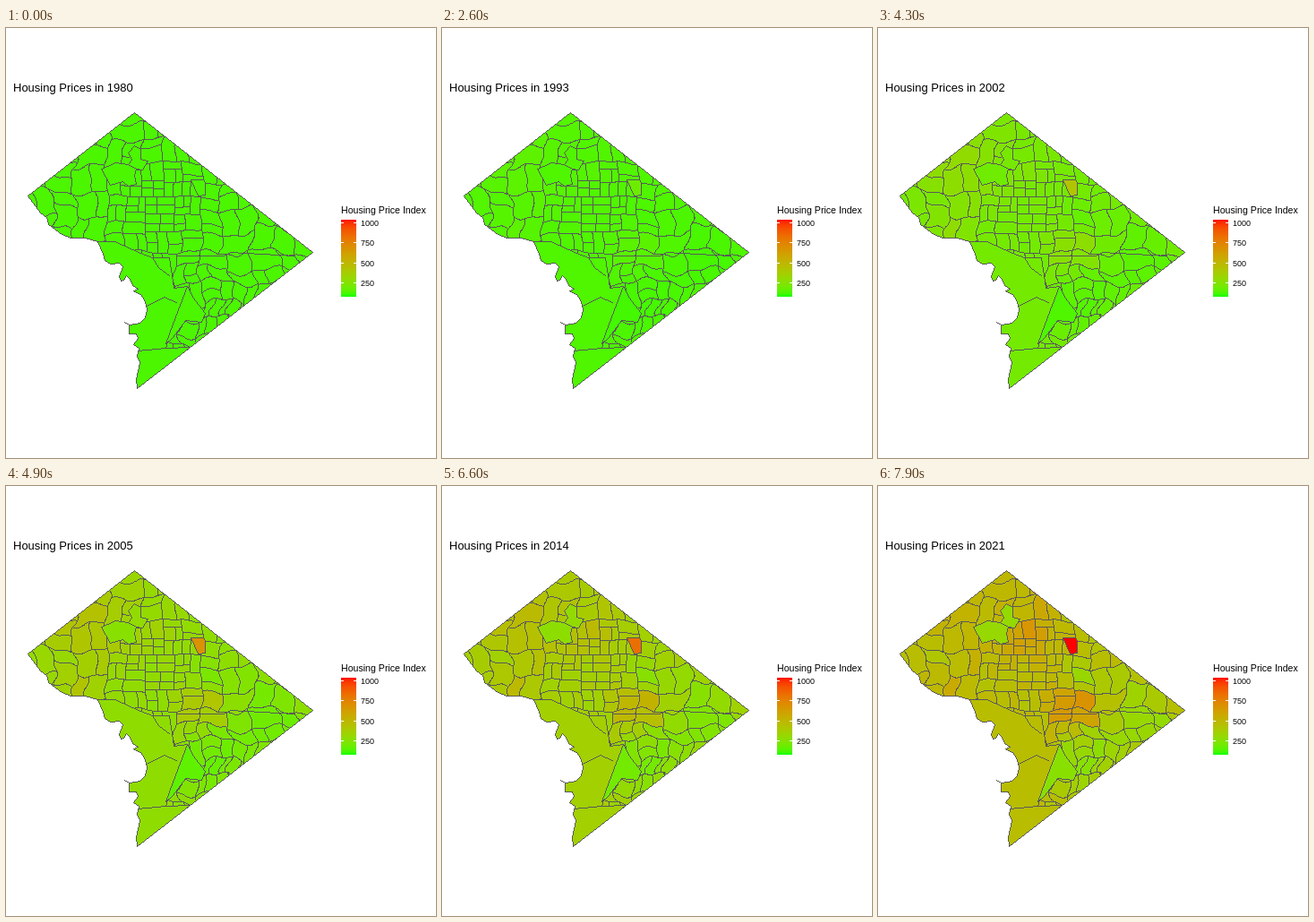
Write an HTML page with a canvas that moves like this. It is 480 px wide and 480 px high and loops after 10000 ms.

```html
<!DOCTYPE html>
<html lang="en">
<head>
<meta charset="utf-8">
<title>Housing Prices</title>
<style>
html, body { margin: 0; width: 100%; height: 100%; overflow: hidden; background: #fff; }
canvas { display: block; }
</style>
</head>
<body>
<canvas id="stage" width="480" height="480"></canvas>
<script>
const ctx = document.getElementById('stage').getContext('2d');
const LOW = 73, HIGH = 1033, STEPS = 79, STEP_MS = 100, LOOP_MS = 10000;
const FONT = '"Liberation Sans", Arial, sans-serif';

const clamp = t => Math.max(0, Math.min(1, t));
const lerp = (a, b, t) => a + (b - a) * t;
const parse = s => s.trim().split(/\s+/).map(p => p.split(',').map(Number));

function seeded(seed) {
  return () => {
    seed = seed + 0x6D2B79F5 | 0;
    let t = Math.imul(seed ^ seed >>> 15, 1 | seed);
    t = t + Math.imul(t ^ t >>> 7, 61 | t) ^ t;
    return ((t ^ t >>> 14) >>> 0) / 4294967296;
  };
}
const random = seeded(41);

// Green to red, blended in Lab space
function colour(value) {
  const t = clamp((value - LOW) / (HIGH - LOW));
  const fy = (lerp(87.73, 53.24, t) + 16) / 116;
  const fx = fy + lerp(-86.18, 80.09, t) / 500;
  const fz = fy - lerp(83.18, 67.2, t) / 200;
  const cube = f => f > 6 / 29 ? f ** 3 : (f - 4 / 29) * 108 / 841;
  const x = 0.9505 * cube(fx), y = cube(fy), z = 1.089 * cube(fz);
  const gamma = c => Math.round(255 * clamp(
    c > 0.0031308 ? 1.055 * c ** (1 / 2.4) - 0.055 : 12.92 * c));
  return `rgb(${gamma(3.2406 * x - 1.5372 * y - 0.4986 * z)},${
    gamma(-0.9689 * x + 1.8758 * y + 0.0415 * z)},${
    gamma(0.0557 * x - 0.204 * y + 1.057 * z)})`;
}

function shape(points) {
  const path = new Path2D();
  points.forEach(([x, y]) => path.lineTo(x + 0.5, y + 0.5));
  path.closePath();
  return path;
}

// Crisp one-pixel border lines, drawn once on their own layer
const layer = document.createElement('canvas');
layer.width = layer.height = 480;
const pen = layer.getContext('2d');
pen.fillStyle = '#595959';

function trace(points, closed) {
  const all = closed ? [...points, points[0]] : points;
  for (let i = 1; i < all.length; i++) {
    const [x, y] = all[i - 1], [u, v] = all[i];
    const n = Math.ceil(Math.max(Math.abs(u - x), Math.abs(v - y), 1));
    for (let k = 0; k <= n; k++) {
      pen.fillRect(Math.round(lerp(x, u, k / n)), Math.round(lerp(y, v, k / n)), 1, 1);
    }
  }
}

const border = parse(`143,94 342,250 146,402 145,392 149,373 146,366 148,357 142,353 147,346
  145,341 137,341 137,331 132,328 138,331 149,329 155,323 157,314 155,305 150,297 142,293 147,291
  141,287 138,280 134,276 131,281 128,282 126,277 130,266 126,262 116,263 110,259 108,252 102,238
  88,234 72,234 62,230 47,219 45,211 38,206 24,187`);
const district = shape(border);

// City-wide level by year
const TREND = parse(`1980,126 1989,150 1993,131 1998,136 2002,192 2005,272 2007,322 2011,311
  2014,350 2021,460`);

function trend(year) {
  const i = Math.max(1, TREND.findIndex(([y]) => y >= year));
  const [y0, v0] = TREND[i - 1], [y1, v1] = TREND[i];
  return lerp(v0, v1, (year - y0) / (y1 - y0));
}

// Neighbourhoods that grow faster or slower than the city, early and late
const hub = (x, y, r, early, late) => ({ x, y, r, early, late });
const hubs = [
  hub(85, 150, 52, 1, 0.2),
  hub(80, 222, 24, 0.7, 0.2),
  hub(72, 195, 15, -0.7, -0.5),
  hub(218, 246, 27, 0.9, 0.75),
  hub(166, 168, 24, 0.2, 0.5),
  hub(180, 128, 13, 0.2, 0.45),
  hub(232, 212, 20, -0.5, -0.55),
  hub(300, 258, 45, -0.5, -0.4),
  hub(232, 308, 42, -0.55, -0.5)
];

function growth(x, y) {
  const noise = (random() - 0.5) * 0.25;
  const sum = { early: noise, late: noise };
  for (const h of hubs) {
    const pull = Math.exp(-((x - h.x) ** 2 + (y - h.y) ** 2) / h.r ** 2);
    sum.early += h.early * pull;
    sum.late += h.late * pull;
  }
  return sum;
}

const tracts = [];
function tract(points, { early, late }) {
  const path = shape(points);
  tracts.push({ path, early, late });
  pen.globalCompositeOperation = 'destination-out';
  pen.fill(path);
  pen.globalCompositeOperation = 'source-over';
  trace(points, true);
}

// Blocks are small and square downtown, larger and bent further out
const fromCentre = (x, y) => Math.hypot(x - 172, y - 195);
function blockSize(x, y) {
  const outer = lerp(11, 25, clamp((fromCentre(x, y) - 25) / 75));
  return y > 265 && x > 190 ? 15 : outer;
}

function bend([x, y]) {
  const bow = 4.5 * clamp(fromCentre(x, y) / 90 - 0.2);
  return [
    x + bow * (Math.sin(y / 11 + x / 40) + 0.4 * Math.sin(y / 3.7)),
    y + bow * (Math.sin(x / 12 - y / 35) + 0.4 * Math.sin(x / 4.1))
  ];
}

function outline(x, y, w, h) {
  const corners = [[x, y], [x + w, y], [x + w, y + h], [x, y + h]];
  return corners.flatMap(([a, b], i) => {
    const [c, d] = corners[(i + 1) % 4];
    const n = Math.ceil(Math.hypot(c - a, d - b) / 3);
    return Array.from({ length: n }, (_, k) => bend([lerp(a, c, k / n), lerp(b, d, k / n)]));
  });
}

function divide(x, y, w, h) {
  const cx = x + w / 2, cy = y + h / 2;
  if (w * h < blockSize(cx, cy) ** 2 * lerp(1.1, 1.9, random())) {
    const points = outline(x, y, w, h);
    if (ctx.isPointInPath(district, cx, cy) || points.some(p => ctx.isPointInPath(district, ...p))) {
      tract(points, growth(cx, cy));
    }
    return;
  }
  const cut = lerp(0.36, 0.64, random());
  if (w > h * lerp(0.8, 1.25, random())) {
    divide(x, y, w * cut, h);
    divide(x + w * cut, y, w * (1 - cut), h);
  } else {
    divide(x, y, w, h * cut);
    divide(x, y + h * cut, w, h * (1 - cut));
  }
}

function buildMap() {
  pen.save();
  pen.clip(district);
  divide(14, 84, 340, 330);
  const even = { early: 0, late: 0 };
  // Waterfront and the southern tip
  tract(parse(`100,238 121,238 150,251 163,256 182,256 187,290 202,288 186,330 178,357 146,360
    120,360 120,290 100,270`), even);
  tract(parse('146,360 178,357 205,356 146,404 130,404'), even);
  trace(parse('163,256 170,267 182,276'));
  trace(parse('157,310 176,300 190,306'));
  // Creek valley, east bank and the fastest riser
  tract(parse('106,157 122,150 136,152 145,157 143,164 145,174 136,176 130,171 116,175'),
    { early: -0.1, late: -0.42 });
  tract(parse('143,131 150,135 150,146 158,148 152,158 145,157 136,152 140,147 136,139'),
    { early: 0.1, late: -0.45 });
  tract(parse('202,288 208,300 222,318 218,328 200,326 186,345 178,352 186,330'),
    { early: -0.7, late: -0.55 });
  tract(parse('206,169 220,169 222,173 222,186 214,187'), { early: 2.2, late: 1.6 });
  trace(parse('190,254 242,254 250,250 322,254'));
  pen.restore();
  trace(border, true);
}

function text(string, x, y, size) {
  ctx.font = `${size}px ${FONT}`;
  ctx.fillStyle = '#000';
  ctx.fillText(string, x, y);
}

function legend() {
  text('Housing Price Index', 374, 207, 10.6);
  for (let y = 214; y < 300; y++) {
    ctx.fillStyle = colour(lerp(HIGH, LOW, (y - 213.5) / 86));
    ctx.fillRect(374, y, 17, 1);
  }
  for (let mark = 1000; mark > 0; mark -= 250) {
    const y = Math.round(214 + (HIGH - mark) / (HIGH - LOW) * 86);
    ctx.fillStyle = '#fff';
    ctx.fillRect(374, y, 3, 1);
    ctx.fillRect(388, y, 3, 1);
    text(mark, 396, y + 4, 9);
  }
}

function draw(step) {
  const year = 1980 + 41 * step / STEPS;
  const rise = trend(year) - 100;
  const spread = clamp((year - 1984) / 12);
  const late = clamp((year - 2004) / 17);
  ctx.fillStyle = '#fff';
  ctx.fillRect(0, 0, 480, 480);
  text('Housing Prices in ' + Math.round(year), 8, 71, 13);
  ctx.save();
  ctx.clip(district);
  for (const t of tracts) {
    ctx.fillStyle = colour(100 + rise * (1 + spread * lerp(t.early, t.late, late)));
    ctx.fill(t.path);
  }
  ctx.restore();
  ctx.drawImage(layer, 0, 0);
  legend();
}

buildMap();
let shown = -1;
const start = performance.now();
function tick() {
  const time = (performance.now() - start) % LOOP_MS;
  const step = Math.min(STEPS, Math.floor(time / STEP_MS));
  if (step !== shown) draw(shown = step);
  requestAnimationFrame(tick);
}
tick();
</script>
</body>
</html>
```
